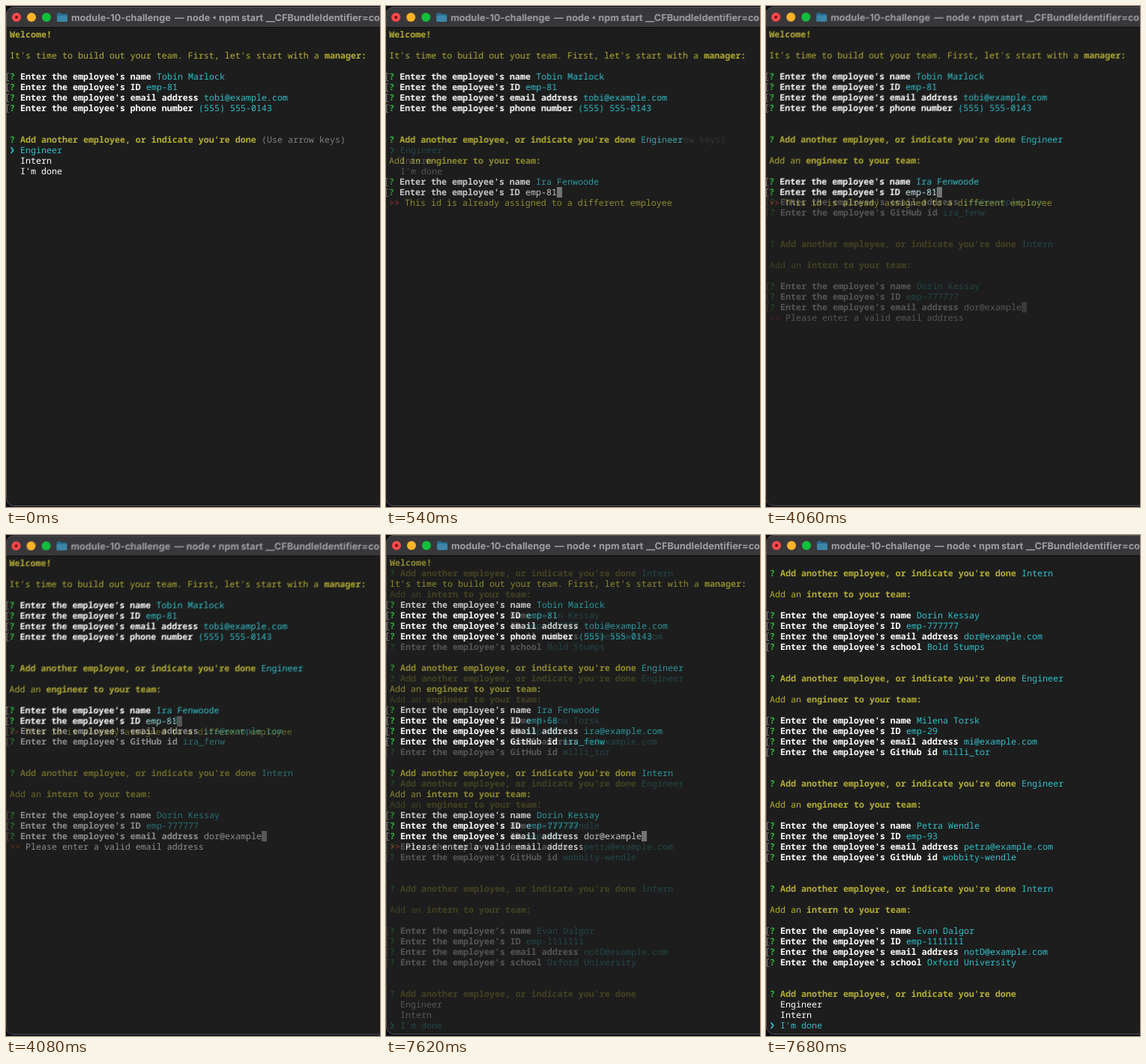
Write an HTML page that moves like this. It is 499 px wide and 667 px high and loops after 8 s.

```html
<!DOCTYPE html>
<html lang="en">
<head>
<meta charset="utf-8">
<title>Team builder terminal</title>
<style>
html, body { margin: 0; width: 100%; height: 100%; overflow: hidden; background: #0a0916; }
svg { display: block; width: 499px; height: 667px; }
text { white-space: pre; text-rendering: geometricPrecision; }
.mono { font: 500 11.667px "Noto Sans Mono", "DejaVu Sans Mono", monospace; }
.bold { font-weight: 700; }
.title { font: 700 12.7px Inter, "Open Sans", sans-serif; fill: #a09fa2; }
</style>
</head>
<body>
<svg id="stage" viewBox="0 0 499 667"></svg>
<script>
const NS = 'http://www.w3.org/2000/svg';
const stage = document.getElementById('stage');
const CELL = 7, LINE = 14, LOOP = 8000, STEP = 20, STEPS = 4;
const WHITE = '#ffffff', YELLOW = '#b4ae34', CYAN = '#31bfc9',
      GREEN = '#30b53c', RED = '#cb3c2a', GRAY = '#7f7f7f';

function add(parent, tag, attrs, text) {
  const el = document.createElementNS(NS, tag);
  for (const key in attrs) el.setAttribute(key, attrs[key]);
  if (text) el.textContent = text;
  parent.appendChild(el);
  return el;
}

// Pieces of a terminal line: [text, colour, bold]
const plain = (text, fill) => [text, fill, false];
const strong = (text, fill) => [text, fill, true];

function drawWindow(g) {
  const frame = { x: 0.5, y: 1.5, width: 560, height: 664, rx: 10 };
  add(g, 'rect', { ...frame, fill: '#1d1d1d' });
  add(g, 'path', { d: 'M0.5 28V11.5a10 10 0 0 1 10-10H520V28Z', fill: '#38373a' });
  add(g, 'rect', { x: 0, y: 28, width: 520, height: 1, fill: '#0c0c0c' });
  add(g, 'rect', { ...frame, fill: 'none', stroke: '#565559' });
  ['#fe4a4b', '#fdb32a', '#12bf3c'].forEach((fill, i) =>
    add(g, 'circle', { cx: 14 + 20 * i, cy: 15, r: 6, fill }));
  add(g, 'circle', { cx: 14, cy: 15, r: 2, fill: '#750c0b' });
  add(g, 'path', { d: 'M68 10.5q0-1.5 1.5-1.5h3.5l1.5 1.5h6q1.5 0 1.5 1.5v8H68Z', fill: '#276a8b' });
  add(g, 'rect', { x: 68, y: 12.5, width: 14, height: 8.5, rx: 1.2, fill: '#3b86a9' });
  const words = [[87, 'module-10-challenge'], [225, '—'], [241, 'node'],
                 [284, 'npm'], [314, 'start'], [347, '__CFBundleIdentifier=co']];
  for (const [x, word] of words) add(g, 'text', { x, y: 19.5, class: 'title' }, word);
  add(g, 'path', { d: 'M279.5 13v5l-4-2.5Z', fill: '#a09fa2' });
}

function makeScene(dx, dy, write) {
  const root = add(stage, 'g', {});
  add(root, 'rect', { width: 499, height: 667, fill: '#0a0916' });
  const g = add(root, 'g', { transform: `translate(${dx} ${dy})` });
  drawWindow(g);
  write(terminal(g));
  return root;
}

function terminal(g) {
  const base = row => 42 + LINE * row;

  function line(row, ...pieces) {
    let col = 0;
    for (const [text, fill, bold] of pieces) {
      add(g, 'text', { x: 5 + CELL * col, y: base(row), fill, class: bold ? 'mono bold' : 'mono' }, text);
      col += text.length;
    }
    return col;
  }

  function ask(row, label, answer, typing) {
    add(g, 'path', { d: `M4 ${base(row) - 8.5}H1.5v10H4`, fill: 'none', stroke: '#777777' });
    const col = line(row, strong('? ', GREEN), strong(label + ' ', WHITE),
                     plain(answer, typing ? WHITE : CYAN));
    if (typing) add(g, 'rect', { x: 5 + CELL * col, y: base(row) - 11, width: CELL, height: LINE, fill: '#919191' });
  }

  function menu(row, answer, fill = CYAN) {
    line(row, strong('? ', GREEN), strong("Add another employee, or indicate you're done ", YELLOW), plain(answer, fill));
  }

  function choices(row, picked) {
    ['Engineer', 'Intern', "I'm done"].forEach((name, i) => {
      const on = i === picked, y = base(row + i);
      line(row + i, plain('  ', WHITE), plain(name, on ? CYAN : WHITE));
      if (on) add(g, 'path', { d: `M6.6 ${y - 8}l3 4-3 4`, fill: 'none', stroke: CYAN, 'stroke-width': 1.8 });
    });
  }

  const fields = ['name', 'ID', 'email address'].map(f => "Enter the employee's " + f);

  function person(row, last, answers, typing = false) {
    const labels = [...fields, "Enter the employee's " + last];
    answers.forEach((a, i) => ask(row + i, labels[i], a, typing && i === answers.length - 1));
  }

  function member(row, role, answers, typing) {
    menu(row, role);
    line(row + 2, plain('Add an ', YELLOW), strong(role.toLowerCase() + ' to your team:', YELLOW));
    person(row + 4, role === 'Intern' ? 'school' : 'GitHub id', answers, typing);
  }

  function intro() {
    line(0, strong('Welcome!', YELLOW));
    line(2, plain("It's time to build out your team. First, let's start with a ", YELLOW), strong('manager:', YELLOW));
    person(4, 'phone number', ['Tobin Marlock', 'emp-81', 'tobi@example.com', '(555) 555-0143']);
  }

  const warn = (row, text, fill) => line(row, plain('>> ', RED), plain(text, fill));

  return { menu, choices, member, intro, warn };
}

const scenes = [
  makeScene(0, 0, t => {
    t.intro();
    t.menu(10, '(Use arrow keys)', GRAY);
    t.choices(11, 0);
  }),
  makeScene(-1, 0, t => {
    t.intro();
    t.member(10, 'Engineer', ['Ira Fenwoode', 'emp-81'], true);
    t.warn(16, 'This id is already assigned to a different employee', YELLOW);
  }),
  makeScene(0, -1, t => {
    t.intro();
    t.member(10, 'Engineer', ['Ira Fenwoode', 'emp-68', 'ira@example.com', 'ira_fenw']);
    t.member(20, 'Intern', ['Dorin Kessay', 'emp-777777', 'dor@example'], true);
    t.warn(27, 'Please enter a valid email address', WHITE);
  }),
  makeScene(0, -1, t => {
    t.member(1, 'Intern', ['Dorin Kessay', 'emp-777777', 'dor@example.com', 'Bold Stumps']);
    t.member(11, 'Engineer', ['Milena Torsk', 'emp-29', 'mi@example.com', 'milli_tor']);
    t.member(21, 'Engineer', ['Petra Wendle', 'emp-93', 'petra@example.com', 'wobbity-wendle']);
    t.member(31, 'Intern', ['Evan Dalgor', 'emp-1111111', 'notD@example.com', 'Oxford University']);
    t.menu(41, '');
    t.choices(42, 2);
  })
];
const starts = [0, 500, 4060, 7620];

// Each new screen fades in over the last one in four even steps.
function render(time) {
  const now = starts.filter(s => time >= s).length - 1;
  const step = Math.floor((time - starts[now]) / STEP) + 1;
  const mix = now ? Math.min(1, step / STEPS) : 1;
  scenes.forEach((scene, i) => {
    const shown = i === now || (i === now - 1 && mix < 1);
    scene.setAttribute('display', shown ? 'inline' : 'none');
    scene.setAttribute('opacity', i === now ? mix : 1);
  });
}

const begin = performance.now();
function tick() {
  render((performance.now() - begin) % LOOP);
  requestAnimationFrame(tick);
}
tick();
</script>
</body>
</html>
```
